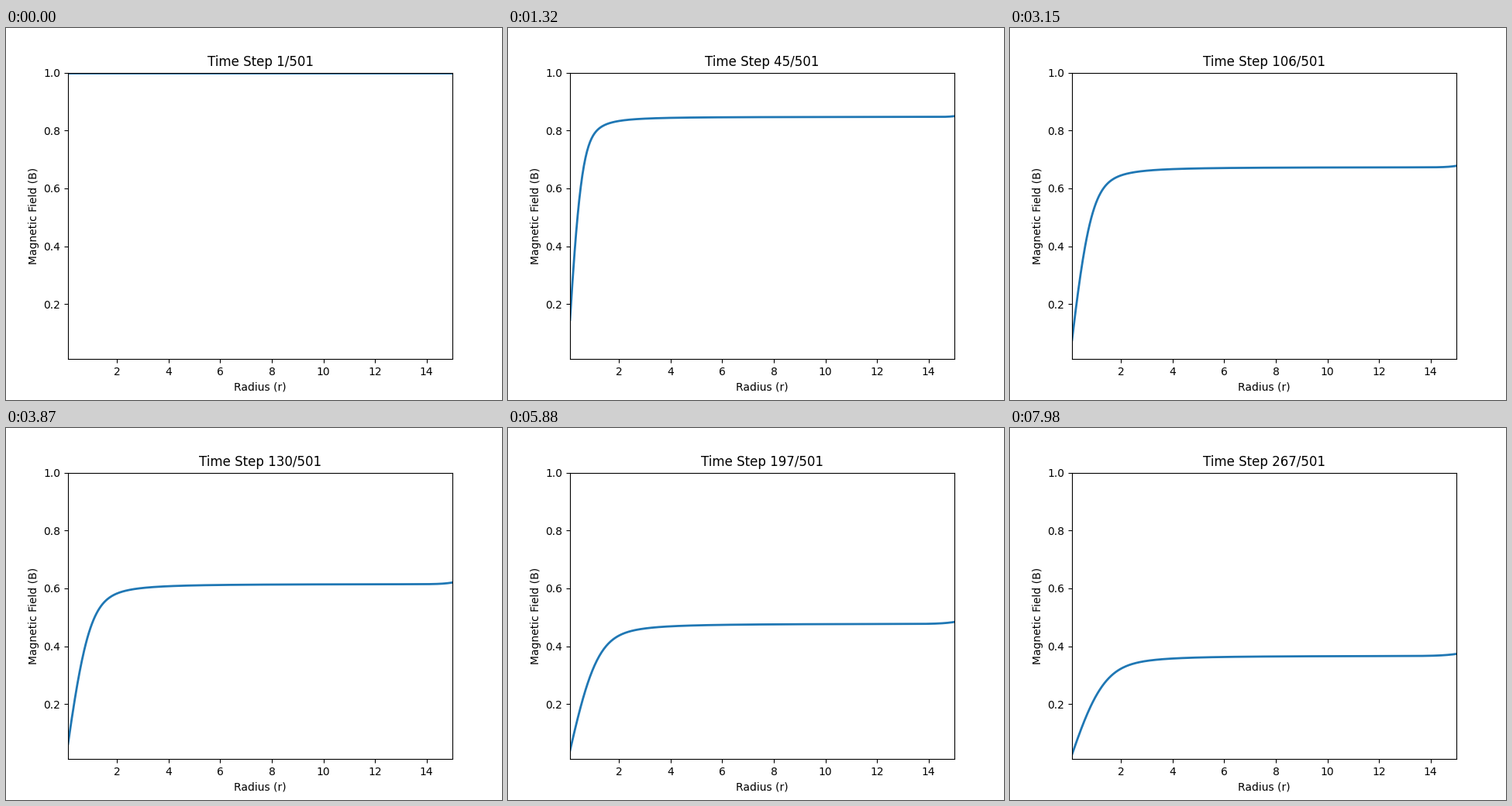
Write a matplotlib script that moves like this. It is 640x480 px and loops after 8 s.

```python
import math

import numpy as np
import matplotlib.pyplot as plt
from matplotlib.animation import FuncAnimation

FRAMES = 267
LOOP_MS = 8000
STEPS = 501
DECAY = 0.003768     # uniform loss per step
DIFFUSION = 0.00149  # diffusivity times the time step
EDGE = 7.2e-5        # slower loss at the outer wall

plt.rcParams["font.family"] = "DejaVu Sans"

r = np.linspace(0.1, 15, 500)
theta = (np.arange(300) + 0.5) * math.pi / 300
cos = np.cos(theta)
erfc = np.vectorize(math.erfc)


def core(tau):
    """Diffusion of an azimuthal field that starts at 1 everywhere."""
    x = r**2 / (8 * tau)
    b = 1 - tau / r**2
    near = x < 30
    bessel = np.exp(np.outer(x[near], cos - 1)) @ (1 + cos) / len(cos)
    b[near] = r[near] * math.sqrt(math.pi / tau) / 4 * bessel
    return b


def wall(tau):
    """Profile of a steadily rising boundary value diffusing inwards."""
    z = (r[-1] - r) / (2 * math.sqrt(tau))
    return (1 + 2 * z**2) * erfc(z) - 2 * z * np.exp(-z**2) / math.sqrt(math.pi)


def field(step):
    if step == 0:
        return np.ones_like(r)
    tau = DIFFUSION * step
    return math.exp(-DECAY * step) * (core(tau) + EDGE * step * wall(tau))


fig, ax = plt.subplots(figsize=(6.4, 4.8), dpi=100)
line, = ax.plot(r, field(0), color="#1f77b4", lw=2)
ax.set_xlim(r[0], r[-1])
ax.set_ylim(0.01, 1)
ax.set_xlabel("Radius (r)")
ax.set_ylabel("Magnetic Field (B)")
title = ax.set_title("")


def update(step):
    line.set_ydata(field(step))
    title.set_text(f"Time Step {step + 1}/{STEPS}")
    return line, title


anim = FuncAnimation(fig, update, frames=FRAMES, interval=LOOP_MS / FRAMES,
                     repeat=True, repeat_delay=0, blit=False)
plt.show()
```
